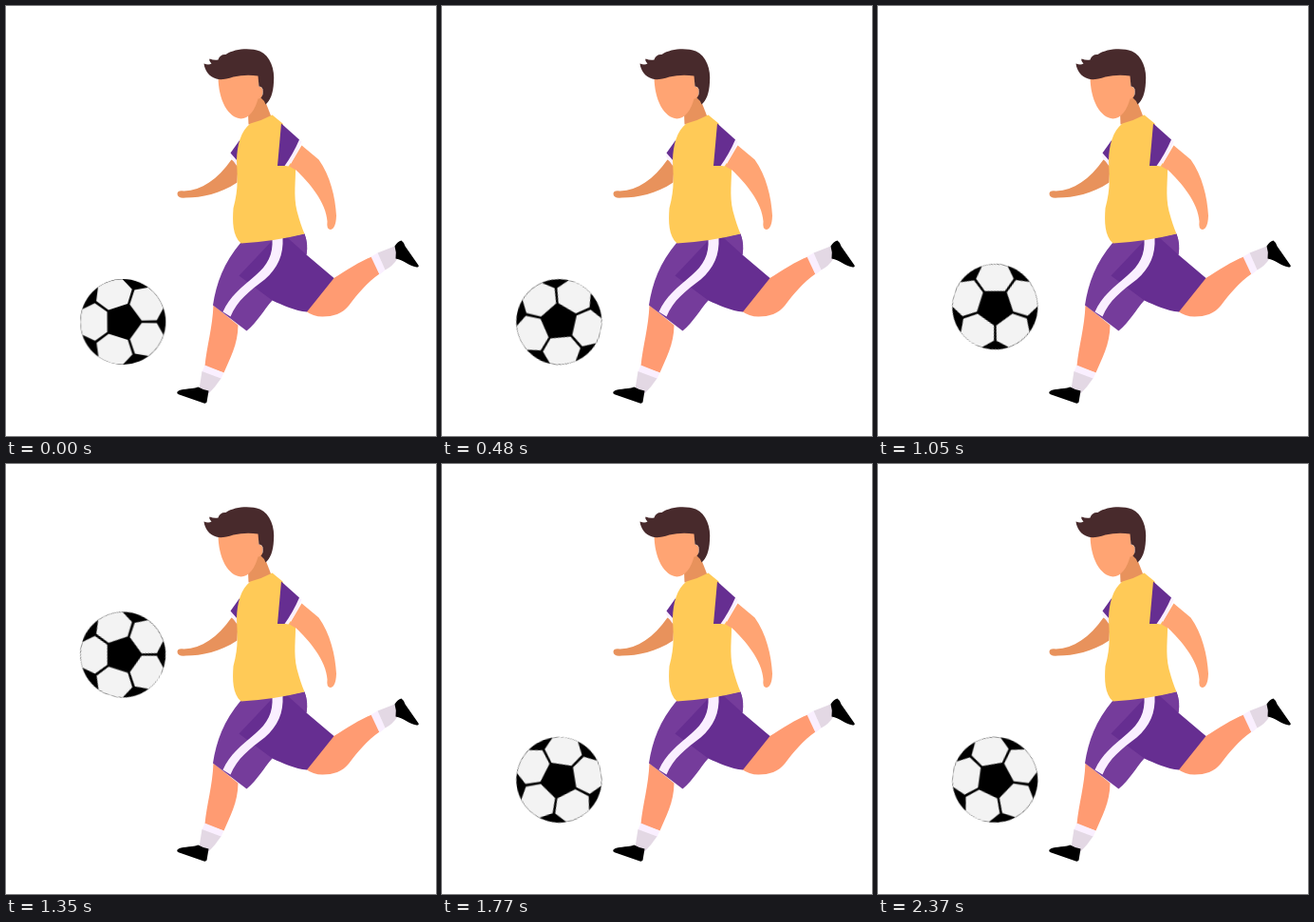
An HTML page that plays this animation: 453 by 452 pixels, repeating every 2.4 s.

```html
<!DOCTYPE html>
<html lang="en">
<head>
<meta charset="utf-8">
<title>Football kick</title>
<style>
html, body { margin: 0; width: 100%; height: 100%; overflow: hidden; background: #fff; }
svg { display: block; width: 100vw; height: 100vh; }
.bounce { animation: bounce 2400ms linear infinite; }
.spin { animation: spin 2400ms linear infinite; }
.bounce, .spin { transform-origin: 0 0; }
@keyframes bounce {
  0% { transform: translate(123.3px, 332px); }
  38.9% { transform: translate(123.3px, 332px); animation-timing-function: cubic-bezier(.33, 0, .67, .33); }
  54.17% { transform: translate(123.3px, 178px); }
  68.75%, 100% { transform: translate(123.3px, 332px); }
}
@keyframes spin {
  0% { transform: rotate(0deg); }
  20% { transform: rotate(-167deg); }
  33.75% { transform: rotate(-279deg); }
  43.75% { transform: rotate(-342deg); }
  56.25% { transform: rotate(-432deg); }
  73.75% { transform: rotate(-549deg); }
  100% { transform: rotate(-720deg); }
}
.skin { fill: #ff9b72; }
.light { fill: #ffa473; }
.shade { fill: #e8925c; }
.hair { fill: #482a2c; }
.shirt { fill: #ffca57; }
.purple { fill: #662e91; }
.violet { fill: #753c9b; }
.trim { fill: #faefff; }
.sock { fill: #e3d8e4; }
</style>
</head>
<body>
<svg viewBox="0 0 453 452" preserveAspectRatio="none">
  <defs>
    <path id="patch" d="M16.6 -10.6L29.6 -19.8L42.7 -13.6A44.8 44.8 0 0 1 42.7 13.6L29.6 19.8L16.6 10.6Z"/>
  </defs>

  <g transform="translate(.5 .5)">
    <!-- head -->
    <path class="shade" d="M254.500 112L260 92L270 93L279 116Q267 124 255 124Z"/>
    <path class="light" d="M223 73Q244 66 266 71L266 84Q271 85 270 91Q269 97 265 97C262 109 255 118 247 118C234 117 223 99 223 73Z"/>
    <path class="hair" d="M208 60Q213 62 216 60Q213 57 214 55Q219 57 223 56Q225 50 231 50.500C241 44 257 43.500 267 47C278 52 283 66 281.500 80C281 91 278 99 273 103Q272 99 268 96Q271 93 270 87Q269 84 266 84L265 73Q252 71 239 74Q227 78 221 76C214 74 209 68 208 60Z"/>

    <!-- far arm -->
    <path class="shade" d="M237 161L244 166L243 185C225 197 206 201 189 201Q180 202 180 197Q180 193 187 194C206 193 222 182 237 161Z"/>
    <path class="trim" d="M235 157L238 154L244 161L243 168Z"/>
    <path class="purple" d="M246 140L236 154L243 162Z"/>

    <!-- back leg -->
    <path class="skin" d="M344 286C359 277 372 268 385 263L393 281C380 290 370 302 361 314C354 323 344 326 333 326Q323 326 315 320Z"/>
    <path class="trim" d="M384 263L391 259L399 277L393 282Z"/>
    <path class="sock" d="M391 259L409 252L412 265Q407 273 399 277Z"/>
    <path d="M409 252Q412 247 416 246Q419 248 420 252L434 272Q435 274 432 274C424 273 418 266 410 265Q411 258 409 252Z"/>

    <!-- front leg -->
    <path class="skin" d="M218 314L244 335C244 355 235 371 229 385L209 378C211 357 217 338 218 314Z"/>
    <path class="trim" d="M209 377L229 385L226 391.500L206 384Z"/>
    <path class="sock" d="M206 383.500L226 391Q220 400 213 407L203 402Z"/>
    <path d="M180 405C184 401 193 403 202 400Q207 403 213 404L211 416Q210 417.500 208 417L182 408Q179 407 180 405Z"/>

    <!-- shorts -->
    <path class="violet" d="M247 248L290 243L280 309C271 319 265 331 253 341L217.500 314C221 291 229 269 247 248Z"/>
    <path class="purple" d="M281 245L314 239Q318 250 316 261L345 285.500L316.500 321C304 320 291 314 280 309L245 283Z"/>
    <path class="violet" d="M296 243L314 239Q318 250 316 261Z"/>
    <path class="trim" d="M280 244L291 243C292 261 286 275 272 287C256 299 243 309 236 326L228 321C235 305 248 295 262 283C275 272 281 261 280 244Z"/>

    <!-- shirt -->
    <path class="shirt" d="M280 114L291 123L300 168L304.500 168C305 183 302 198 306 215Q310 230 314 239Q282 247 247 249C238 241 238 226 239 212C245 191 243 175 242.500 162C243 145 247 131 257 123Q269 120 280 114Z"/>

    <!-- near arm -->
    <path class="light" d="M311 146L329 161C341 178 346.500 200 347.500 220Q347 234 341 234.500Q337 234 338 226C337 206 318 184 305 172L298 168Z"/>
    <path class="trim" d="M307 139L311 142Q305 157 297 168L291 167Z"/>
    <path class="purple" d="M289.500 123L308.500 140Q302 155 293 167.500L285.500 167.500Z"/>
  </g>

  <!-- ball -->
  <g class="bounce">
    <g class="spin">
      <circle r="45"/>
      <g id="patches" fill="#f3f3f3"></g>
    </g>
  </g>
</svg>
<script>
const patches = document.getElementById("patches");
for (let i = 0; i < 5; i++) {
  const use = document.createElementNS("http://www.w3.org/2000/svg", "use");
  use.setAttribute("href", "#patch");
  use.setAttribute("transform", `rotate(${36 + i * 72})`);
  patches.append(use);
}
</script>
</body>
</html>
```
